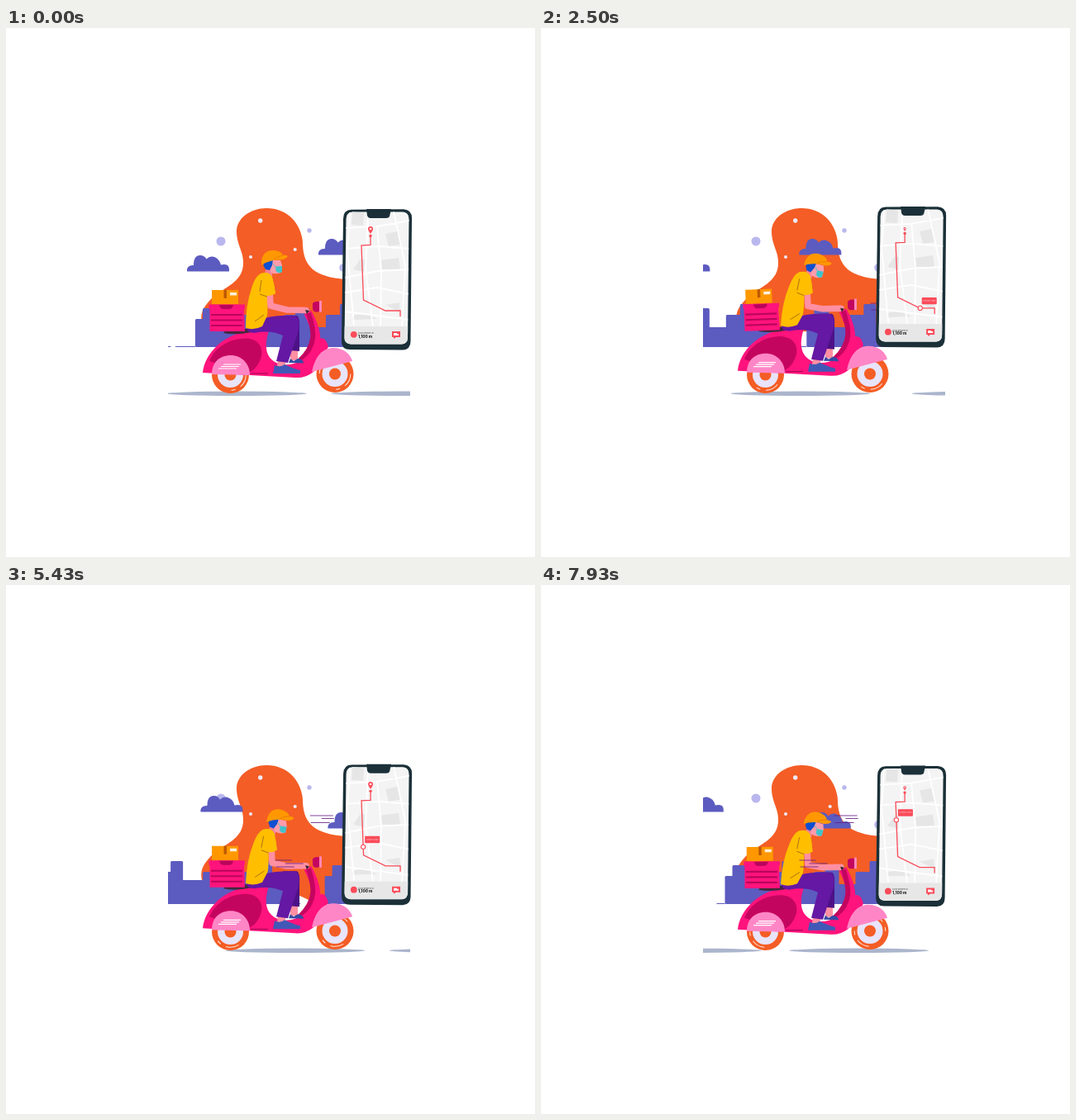
Animation of 640 by 640 pixels, one loop 8 s. Source, as an HTML page:

```html
<!DOCTYPE html>
<html lang="en">
<head>
<meta charset="utf-8">
<title>Scooter delivery</title>
<style>
html, body { margin: 0; width: 100%; height: 100%; overflow: hidden; background: #fff; }
svg { display: block; width: 100%; height: 100%; }
text { font-family: Inter, Arial, sans-serif; }
</style>
</head>
<body>
<svg viewBox="0 0 640 640">
  <defs>
    <clipPath id="strip"><rect x="196" y="200" width="293" height="260"/></clipPath>
    <clipPath id="skyline"><rect x="196" y="200" width="284" height="260"/></clipPath>
    <clipPath id="screenClip"><path d="M411.5 231Q411.500 223 419 222.500H480Q487.500 223 487.500 231L486 374Q486 382 479 382.500H417Q409.5 382 409.5 375Z"/></clipPath>
    <path id="cloud" d="M0 19.5V17Q1 12 8 12Q8 0 16 0Q21 0 23.5 4.5Q27 1 31 1.5Q39 3 41 11.5Q51 9 51 17V19.5Z" fill="#5c5bc0"/>
    <g id="wheel">
      <circle r="22.5" fill="#f45d25"/>
      <circle r="15.5" fill="#e8e4fb"/>
      <circle r="7" fill="#f45d25"/>
      <circle class="shine" r="18.8" fill="none" stroke="#ffe6dc" stroke-width="1" stroke-dasharray="16 7 5 31"/>
    </g>
  </defs>

  <g clip-path="url(#strip)">
    <path fill="#f45d25" d="M315 218C343 218 359 240 359 262C360 290 375 301 410 304C430 306 430 386 410 386H376C350 372 330 364 300 368L254 382C238 368 230 350 242 335C256 314 288 312 287 283C287 270 279 262 279 246C279 230 296 218 315 218Z"/>
    <g fill="#b9b7ee">
      <circle cx="260" cy="258" r="5.5"/><circle cx="367" cy="245" r="2.7"/><circle cx="408" cy="290" r="4.8"/>
    </g>
    <g fill="#efeaff">
      <circle cx="307.7" cy="233" r="2.7"/><circle cx="349.7" cy="268" r="2.1"/><circle cx="296" cy="277" r="2"/>
    </g>
    <g clip-path="url(#skyline)">
      <g id="city" fill="#5c5bc0" stroke="#5c5bc0" stroke-linejoin="round"></g>
    </g>
    <g id="clouds"></g>
    <g id="ground" fill="#abb5cc"></g>
  </g>

  <use href="#wheel" x="271.5" y="419.5"/>
  <use href="#wheel" x="398" y="418.5"/>

  <g id="scooter">
    <path d="M365 344C374 361 383 381 364 403" fill="none" stroke="#ff137c" stroke-width="10"/>
    <path d="M366 345C371 362 379 381 355 403" fill="none" stroke="#c4055f" stroke-width="6"/>
    <path d="M376 378Q386 370 390 386L372 416Q362 424 350 423L295 420L238 417C240 395 262 371 290 368L318 366C312 385 313 401 332 407C350 409 366 402 376 378Z" fill="#ff137c"/>
    <path d="M246 403C252 387 270 375 292 375.5C306 377 311 387 309 397C305 411 298 415 291 418Z" fill="#c4055f"/>
    <path d="M249 419C249 403 260 396 272 396C285 396 295 406 295 420Z" fill="#ff86c6"/>
    <path d="M263 407H284M260 409.5H282M257 412H279" stroke="#fff" stroke-width="1.2"/>
    <path d="M370 416C374 396 384 387 396 387C409 387 417 395 419 403Z" fill="#ff86c6"/>
    <path d="M371 333Q374 330 379 331V343Q371 345 371 339Z" fill="#c4055f"/>
    <path d="M379 330H382V343.5H379Z" fill="#ff86b9"/>
    <path d="M296 418H317" stroke="#9c0550" stroke-width="1"/>
    <path d="M263 369Q277 372 297 368L294 364H267Z" fill="#43283d"/>

    <path d="M344 389H353V402H344Z" fill="#ff8fa2"/>
    <path d="M342 405L344 400L348 403L353 400Q360 401 360 405.5Z" fill="#354aa5"/>
    <path d="M335 348H352Q356 350 355 365V391L343 390Z" fill="#4d1187"/>
    <path d="M329 400L339 402L337 410H328Z" fill="#ff8fa2"/>
    <path d="M291 363C305 350 325 347 350 348Q357 352 354 366L341 405L327 403L335 372Q320 365 300 369Q291 368 291 363Z" fill="#6418a3"/>
    <path d="M323 418L325 408Q332 411 337 407Q350 413 356 414V418Z" fill="#4158b6"/>

    <g id="torso">
      <g id="head">
        <path d="M315 287H323L322 301L313 298Z" fill="#f47f95"/>
        <path d="M319 281H332L334 287V295Q329 299 320 296Z" fill="#ff9cab"/>
        <path d="M311 283L323 280L322 287L319 293L314 292Q311 288 311 283Z" fill="#0d4fd0"/>
        <path d="M326 288.5L334 288V295Q330 298 326.5 294Z" fill="#41c2cc"/>
        <path d="M323 285L326 289" stroke="#41c2cc" stroke-width=".8"/>
        <path d="M309 287C308 273 316 268 325 269C331 270 334 272 335 275Q339 274 341 276Q338 281 329 280.5Q318 281 309 287Z" fill="#ff9800"/>
        <path d="M324 280Q329 276 335 275" fill="none" stroke="#e57a00" stroke-width=".8"/>
      </g>
      <path d="M308 297Q318 294 322 301Q325 311 326 321L316 325Q317 340 316 348L310 361Q300 366 290 363Q290 335 297 315Q301 301 308 297Z" fill="#ffbe00"/>
    </g>
    <path id="arm" fill="none" stroke="#ff8fa2" stroke-width="7.5" stroke-linejoin="round" stroke-linecap="round"/>
    <g id="sleeve">
      <path d="M310 300Q319 297 322 303L326 321Q321 325 315 324Z" fill="#ffbe00"/>
      <path d="M309 305L307 319M316 325L307 322M312 347L301 355" fill="none" stroke="#9b6118" stroke-width=".8"/>
    </g>
    <path d="M362 341L367 342L364 346Z" fill="#352735"/>
  </g>

  <g clip-path="url(#strip)">
    <g id="gusts" stroke="#672087" stroke-width=".85"></g>
  </g>

  <g id="cargo">
    <path d="M249 317H281V334H249Z" fill="#ff9800"/>
    <path d="M263.5 317H267V327H263.5Z" fill="#bd5900"/>
    <path d="M271 320H279V323.5H271Z" fill="#fff0dc"/>
    <path d="M245.5 334.5H289V340H288L289 367H246.5V340H245.5Z" fill="#ff137c"/>
    <path d="M248 347H286M248 353.5H286M248 360H286" stroke="#b9055b" stroke-width="2.2"/>
    <path d="M258 335H275Q274 340 270 340H263Q259 340 258 335Z" fill="#b9055b"/>
  </g>

  <g id="phone">
    <path d="M408 231Q408 220 418 219.700L481 219.300Q491 220 491 230L489.500 379Q489.500 389 480 389.500L416 389Q406 389 406 379Z" fill="#1b3038"/>
    <g clip-path="url(#screenClip)">
      <path d="M405 220H492V385H405Z" fill="#f4f4f4"/>
      <path d="M419 222L433 224L432 239L418 238ZM459 249L474 246L477 262L463 264ZM454 281L475 278L477 292L455 292ZM429 279L434 280L433 295L420 292ZM419 348L435 345L449 352L419 353ZM459 335L476 332L477 344Z" fill="#e6e6e6"/>
      <path d="M410 242L449 240L488 233M410 267L450 264L488 267M410 302L450 294L488 292M410 320L449 314L488 322M416 222L413 270L421 360M438 226L435 291L444 362M449 240L454 295L453 362M469 222L483 287L479 362M410 343L488 353" fill="none" stroke="#fff" stroke-width="1.8"/>
      <path d="M405 361H490V385H405Z" fill="#e7e7e7"/>
    </g>
    <path d="M436 219H466L464 228Q463 230 460 230H441Q438 230 437 227Z" fill="#1b3038"/>
    <path id="route" d="M477 349V342H459L432.5 329L430 263L441 262.5V252" fill="none" stroke="#fa4b59" stroke-width="1.3"/>
    <circle cx="441" cy="251.5" r="1.7" fill="#fa4b59"/>
    <g id="pin">
      <path d="M0 0Q-3 -4 -3 -6A3 3 0 0 1 3 -6Q3 -4 0 0Z" fill="#fa4b59"/>
      <circle cy="-6" r="1.3" fill="#fff"/>
    </g>
    <circle cx="420.8" cy="370.8" r="3.9" fill="#fa4b59"/>
    <path d="M467 367H477V374H472L469 376V374H467Z" fill="#fa4b59"/>
    <path d="M469 369H473V370H475V372H469Z" fill="#fff"/>
    <text x="426" y="369.7" font-size="2.5" fill="#333">Food delivery in</text>
    <text x="426" y="374.5" font-size="4.7" font-weight="800" fill="#222">1,100 m</text>
    <g id="marker">
      <circle r="2.6" fill="#fff" stroke="#fa4b59" stroke-width="1.1"/>
      <rect x="2" y="-13" width="18" height="8.3" rx=".8" fill="#fa4b59"/>
      <text x="11" y="-8" font-size="2.4" text-anchor="middle" fill="#ffc9ce">Delivery man</text>
    </g>
  </g>
</svg>
<script>
const LOOP = 8000;
const $ = id => document.getElementById(id);
const move = (el, x, y, rest = '') => el.setAttribute('transform', `translate(${x} ${y}) ${rest}`);
const wave = (t, period, peak = 0) => Math.cos(2 * Math.PI * (t - peak) / period);

function add(parent, tag, attrs) {
  const el = document.createElementNS('http://www.w3.org/2000/svg', tag);
  for (const key in attrs) el.setAttribute(key, attrs[key]);
  parent.append(el);
  return el;
}

// Skyline: [left, roof height] for each block, ending at x = 214
const SKYLINE = [[0, 352], [9, 339], [27, 362], [48, 347], [69, 334], [84, 357], [108, 347],
  [121, 339], [138, 362], [158, 347], [175, 334], [192, 357]];
const CITY_GAP = 255.5;
let outline = 'M1.5 384.5';
SKYLINE.forEach(([, top], i) => {
  // A taller neighbour on the right begins at its inset edge, a lower one starts later
  const next = SKYLINE[i + 1] || [214, 400];
  outline += `V${top + 1.5}H${next[0] + (next[1] < top ? 1.5 : -1.5)}`;
});
outline += 'V384.5Z';
for (let i = -1; i < 4; i++) {
  const block = add($('city'), 'g', { transform: `translate(${i * CITY_GAP})` });
  add(block, 'path', { d: outline, 'stroke-width': 3 });
  add(block, 'path', { d: `M214 385.5H226M${i ? -10 : -24} 385.5H0`, 'stroke-width': 1 });
}

[[219, 275], [378, 255], [532, 275]].forEach(([x, y]) => add($('clouds'), 'use', { href: '#cloud', x, y }));

for (let lap = 0; lap < 3; lap++)
  [195, 393.5, 596, 815].forEach(x =>
    add($('ground'), 'ellipse', { cx: x + 84.5 + lap * 866, cy: 442.3, rx: 84.5, ry: 2.7 }));

// Speed lines: [offset, y, length]
const GUSTS = [[0, 279, 28], [14, 282.5, 15], [1, 287.5, 23], [57, 306, 20], [68, 310, 11],
  [-42, 333, 20], [-30, 337, 22], [-41, 341, 22]];
for (let lap = 0; lap < 4; lap++)
  GUSTS.forEach(([x, y, width]) =>
    add($('gusts'), 'path', { d: `M${454 + x + lap * 333} ${y}h${width}` }));

// [time in s, forward lean, cargo tilt in degrees]
const POSES = [[0, 0, 0], [1.21, .62, -.4], [2.5, 1, -2.2], [3.57, 1, -1.3],
  [5.43, .68, 0], [6.29, .72, 0], [7.93, .96, -.3], [8, .96, -.3]];
function poseAt(t) {
  const i = Math.max(1, POSES.findIndex(p => p[0] >= t));
  const [a, b] = [POSES[i - 1], POSES[i]];
  const k = (t - a[0]) / (b[0] - a[0]);
  const ease = k * k * (3 - 2 * k);
  return [1, 2].map(n => a[n] + (b[n] - a[n]) * ease);
}

const shines = document.querySelectorAll('.shine');

function draw(t) {
  const dip = wave(t, 4.2) - 1;
  const [lean, tilt] = poseAt(t);

  move($('city'), 229 - 65.25 * t, 0);
  move($('clouds'), -26.25 * t, 0);
  move($('ground'), -146.5 * t, 0);
  move($('gusts'), -138.5 * t, 0);
  shines.forEach(s => s.setAttribute('transform', `rotate(${t * 375})`));

  move($('scooter'), 0, 1.3 * dip);
  move($('cargo'), 0, dip, `rotate(${tilt} 289 367)`);
  const bend = `rotate(${3.8 * lean} 300 362)`;
  $('torso').setAttribute('transform', bend);
  $('sleeve').setAttribute('transform', bend);
  move($('head'), 1.5 * lean, 3 * lean, `rotate(${12 * lean} 318 299)`);
  $('arm').setAttribute('d', `M${319 + 3 * lean} ${316 + lean}L${320 + 3 * lean} ${336 + 3 * lean}L340 ${341 + lean}L363 341.5`);

  move($('phone'), .8 * (wave(t, 5.5, 4.5) - wave(0, 5.5, 4.5)), 1.7 * dip);
  const pulse = .75 + .25 * wave(t, 5.75, .1);
  move($('pin'), 441, 249, `scale(${pulse})`);
  const spot = $('route').getPointAtLength(Math.max(0, 13.7 * (t - .72)));
  const grow = Math.min(1, Math.max(0, (t - .3) / .3));
  move($('marker'), spot.x, spot.y, `scale(${grow})`);
}

function tick(now) {
  draw(now % LOOP / 1000);
  requestAnimationFrame(tick);
}
draw(0);
requestAnimationFrame(tick);
</script>
</body>
</html>
```
